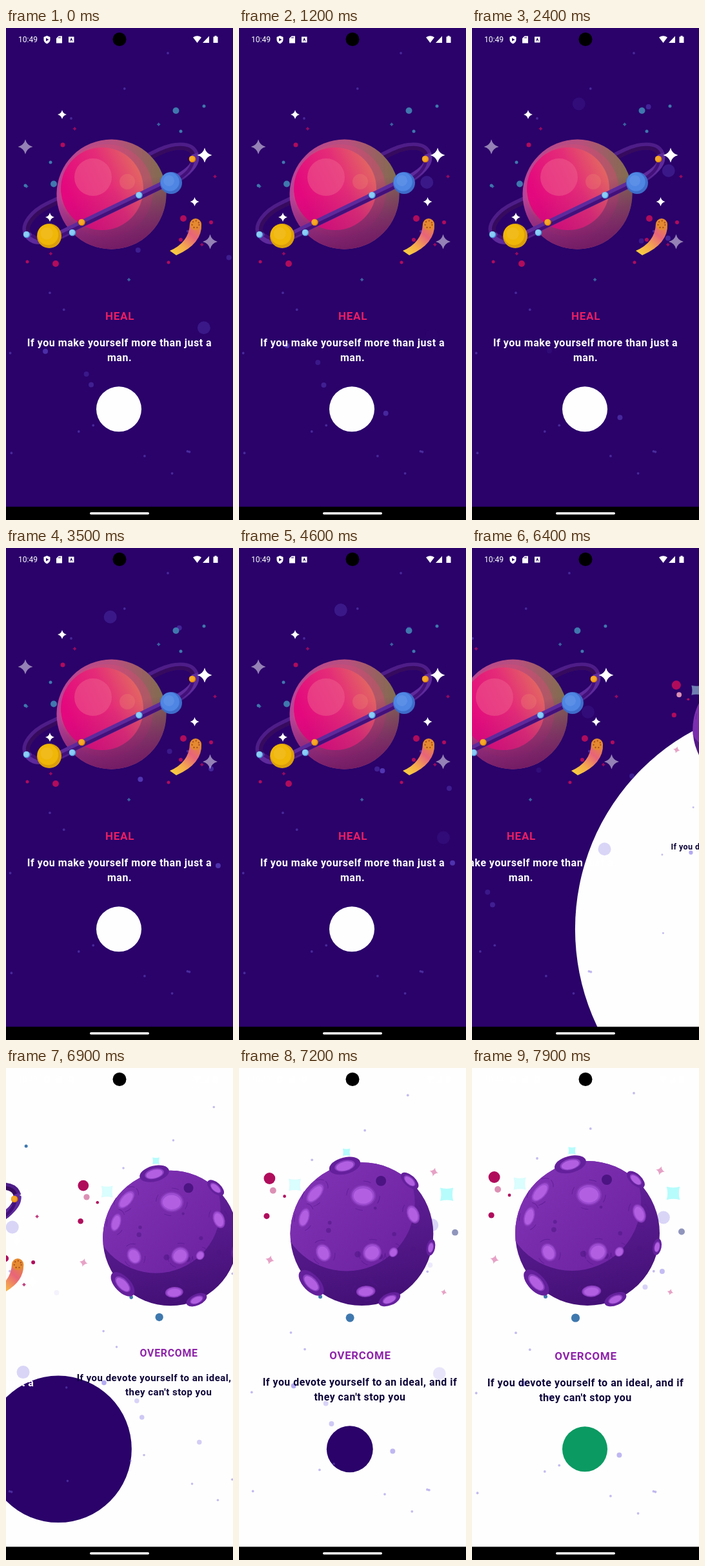
Recreate the animation shown at these times as an HTML page. Size 352 px wide and 762 px high, loop 8000 ms.

```html
<!DOCTYPE html>
<html lang="en">
<head>
<meta charset="utf-8">
<title>Onboarding</title>
<style>
html, body { margin: 0; width: 100%; height: 100%; overflow: hidden; background: #000; }
svg { display: block; }
text { font-family: Roboto, sans-serif; text-anchor: middle; }
.title { font-size: 17px; font-weight: 700; letter-spacing: .75px; }
.body { font-size: 16px; font-weight: 700; letter-spacing: .53px; }
</style>
</head>
<body>
<svg width="352" height="762" viewBox="0 0 352 762">
<defs>
  <linearGradient id="shell">
    <stop offset="0" stop-color="#b8439a"/><stop offset=".55" stop-color="#b8507c"/><stop offset="1" stop-color="#7c704a"/>
  </linearGradient>
  <linearGradient id="shade" x1=".4" y1=".3" x2=".55" y2="1">
    <stop offset=".2" stop-color="#7a1470" stop-opacity="0"/><stop offset="1" stop-color="#701a64" stop-opacity=".95"/>
  </linearGradient>
  <linearGradient id="core" x1=".15" y1=".7" x2="1" y2=".3">
    <stop offset="0" stop-color="#e4087e"/><stop offset=".55" stop-color="#e42c78"/><stop offset="1" stop-color="#e26a60"/>
  </linearGradient>
  <linearGradient id="tail" x1="0" y1="1" x2=".9" y2="0">
    <stop offset="0" stop-color="#fbd83e"/><stop offset=".35" stop-color="#f5ae4a"/><stop offset=".7" stop-color="#e8647a"/><stop offset="1" stop-color="#e58a3c"/>
  </linearGradient>
  <linearGradient id="lit" x1="0" y1="0" x2="1" y2="1">
    <stop offset="0" stop-color="#8638ba"/><stop offset="1" stop-color="#6b219f"/>
  </linearGradient>
  <linearGradient id="dark" x1=".3" y1="0" x2=".5" y2="1">
    <stop offset="0" stop-color="#6a24a2"/><stop offset="1" stop-color="#431076"/>
  </linearGradient>
  <clipPath id="globe"><circle cx="179" cy="256" r="112"/></clipPath>
  <g id="dust"></g>
</defs>

<rect id="back" width="352" height="762"/>
<circle id="button" cy="590.3"/>

<g id="page0">
  <use href="#dust"/>
  <g id="sky0"></g>
  <g transform="translate(163 257) rotate(-25.7)" fill="none">
    <rect x="-144" y="-27" width="288" height="51" rx="48" ry="25" stroke="#4e1d88" stroke-width="11"/>
    <rect x="-141" y="-24" width="282" height="45" rx="45" ry="22" stroke="#360a5e" stroke-width="6"/>
  </g>
  <circle cx="163.500" cy="257.500" r="85" fill="url(#shell)"/>
  <circle cx="156" cy="252" r="72" fill="#d84a70" opacity=".4"/>
  <circle cx="163.500" cy="257.500" r="85" fill="url(#shade)"/>
  <circle cx="149" cy="249" r="64" fill="url(#core)"/>
  <circle cx="163.500" cy="257.500" r="85" fill="url(#shade)" opacity=".35"/>
  <circle cx="135" cy="231" r="29" fill="#f0608e" opacity=".5"/>
  <circle cx="188" cy="238" r="12" fill="#ee8870" opacity=".3"/>
  <g transform="translate(163 257) rotate(-25.7)" fill="none">
    <path id="band" d="M-144 0C-142 20 -120 22 -96 22H96C120 22 142 18 144 0" stroke="#5e2a9c" stroke-width="11"/>
    <path d="M-139 4C-130 21 -112 24.500 -96 24.500H96C116 24.500 132 20 139 4" stroke="#43107a" stroke-width="5"/>
  </g>
  <g id="moons"></g>
  <path d="M303 303Q305 334 264 352L254 345Q284 332 285 303Z" fill="url(#tail)"/>
  <circle cx="294" cy="304" r="9" fill="#e58a30"/>
  <circle cx="294" cy="304" r="5.500" fill="none" stroke="#a84c20" stroke-width="2" stroke-dasharray="2 3"/>
  <text class="title" x="176.500" y="452" fill="#e91e63">HEAL</text>
  <g class="body" fill="#fff"><text x="176" y="493">If you make yourself more than just a</text><text x="176" y="516">man.</text></g>
</g>

<g id="page1">
  <use href="#dust"/>
  <g id="sky1"></g>
  <circle cx="179" cy="256" r="112" fill="url(#dark)"/>
  <circle cx="155" cy="207" r="107" fill="url(#lit)" clip-path="url(#globe)"/>
  <g id="craters"></g>
  <text class="title" x="176.500" y="452" fill="#8e24aa">OVERCOME</text>
  <g class="body" fill="#0c0438"><text x="176" y="493">If you devote yourself to an ideal, and if</text><text x="176" y="516">they can't stop you</text></g>
</g>

<g fill="#fff" fill-rule="evenodd">
  <text x="34" y="22" font-size="12">10:49</text>
  <path d="M63.500 12l5 2v4q0 4-5 6.500q-5-2.500-5-6.500v-4zM62 15.500v5l4.500-2.500z"/>
  <path d="M81.500 12.500h5.500v11h-9v-7.500zM81.500 14v2h1v-2zm2 0v2h1v-2z"/>
  <path d="M97 13.500h8.500v9h-8.500zM99 20.500h1l.5-1.500h1.500l.5 1.500h1l-1.700-5h-1z"/>
  <path d="M290 14.500Q296.500 10 303 14.500L296.500 23zM305 23l10-10.500v10.500zM321.500 13.500h2v-1.500h3v1.500h2v9.500h-7z"/>
</g>
<circle cx="176" cy="17.500" r="10.500"/>
<rect y="741.500" width="352" height="21"/>
<rect x="130" y="750" width="92" height="3.500" rx="1.750" fill="#fff"/>
</svg>

<script>
const $ = id => document.getElementById(id);
let seed = 11;
const rand = (lo, hi) => lo + (hi - lo) * (seed = seed * 16807 % 2147483647) / 2147483647;
const repeat = (n, make) => Array.from({ length: n }, (_, i) => make(i));

function add(parent, tag, attrs) {
  const el = document.createElementNS('http://www.w3.org/2000/svg', tag);
  for (const k in attrs) el.setAttribute(k, attrs[k]);
  return $(parent).appendChild(el);
}
const dot = (parent, cx, cy, r, fill, opacity = 1) => add(parent, 'circle', { cx, cy, r, fill, opacity });
const oval = (x, y, rx, ry, turn, style) =>
  add('craters', 'ellipse', { rx, ry, transform: `translate(${x} ${y}) rotate(${turn})`, ...style });

// Four-pointed star; k is the fatness of the waist.
function star(parent, x, y, s, fill, opacity = 1, turn = 0, k = .2) {
  const c = s * k;
  add(parent, 'path', {
    d: `M0 ${-s}Q${c} ${-c} ${s} 0Q${c} ${c} 0 ${s}Q${-c} ${c} ${-s} 0Q${-c} ${-c} 0 ${-s}Z`,
    transform: `translate(${x} ${y}) rotate(${turn})`, fill, opacity
  });
}

function ball(x, y, r, base, light) {
  dot('moons', x, y, r, base);
  dot('moons', x - r * .1, y - r * .1, r * .85, light);
  dot('moons', x - r * .2, y - r * .2, r * .5, '#fff', .08);
}

// Ringed planet
const teal = '#3f78ae', wine = '#b00c5c';
for (const [x, y, r] of [[263.5, 128, 5], [74, 241.5, 5], [307, 121, 2.5], [271, 160, 2.5], [69, 208, 2.5], [30, 244, 2.5]])
  dot('sky0', x, y, r, teal);
for (const [x, y, r] of [[275, 295, 5], [77, 365, 5], [88, 181, 3.5], [271, 328, 3], [318, 301, 3], [33, 362, 2.5], [252, 363, 2.5]])
  dot('sky0', x, y, r, wine);
repeat(7, i => star('sky0', 180 + 150 * Math.cos(i * .9 + .6), 265 + 125 * Math.sin(i * .9 + .6), 3, i % 2 ? teal : wine, .8, 0, .4));

for (const [x, y, s, alpha] of [[87, 134, 7, 1], [308, 197, 11.5, 1], [68, 293, 7, 1], [292.5, 269, 7, 1], [30, 184, 11.5, .5], [316.5, 331, 11.5, .5]])
  star('moons', x, y, s, '#fff', alpha);
ball(67, 322, 19, '#dc9e0a', '#f0b608');
ball(256, 240, 17, '#3e6cca', '#4f86e4');
for (const [x, y] of [[32, 320], [103, 317], [206.5, 259]]) ball(x, y, 5.3, '#4a92d4', '#84caf6');
for (const [x, y] of [[117.5, 301], [289, 203]]) ball(x, y, 5.3, '#d87c10', '#f6a41c');

// Cratered planet
for (const [x, y, r, fill] of [[34.5, 169, 9, wine], [30, 228, 4.6, wine], [58, 197, 2.4, wine], [40, 188, 5, '#dc90b4'],
  [325, 253.5, 5, '#9095bc'], [160.5, 387, 6.6, teal], [114, 354, 3, teal]])
  dot('sky1', x, y, r, fill);
for (const [x, y, s] of [[292, 159, 7], [35, 296.5, 7], [307.5, 347, 5]]) star('sky1', x, y, s, '#e6a2c6', 1, 15);
for (const [x, y, s, alpha] of [[155, 128, 8, 1], [312, 194, 14.5, 1], [74, 179, 13.5, .5]])
  star('sky1', x, y, s, '#b6fcfc', alpha, 45, .36);

// Craters flatten towards the outline, where they also stand out from it.
function crater(angle, dist, size) {
  const a = angle * Math.PI / 180, outer = dist > 100;
  const x = 179 + dist * Math.cos(a), y = 256 + dist * Math.sin(a);
  const flat = size * Math.max(.52, Math.sqrt(1 - (dist / 112) ** 2)), turn = angle + 90;
  if (!outer) oval(x, y, size + 6, flat + 6, turn, { fill: 'none', stroke: '#54178c', 'stroke-dasharray': '12 26', opacity: .6 });
  oval(x, y, size, flat, turn, { fill: outer ? '#64209c' : '#8438b8' });
  const inset = outer ? .65 : .88;
  oval(x, y, size * inset, flat * inset, turn, { fill: outer ? '#8a40c0' : '#9c4cd0' });
  oval(x, y + .5, size * inset * .85, flat * inset * .8, turn, { fill: '#b25fe2' });
}
repeat(9, () => {
  const a = rand(0, 6.28), d = rand(15, 95);
  dot('craters', 179 + d * Math.cos(a), 256 + d * Math.sin(a), rand(2, 6), '#4c1482', .5);
});
dot('craters', 209, 173, 8, '#4c1482');
for (const c of [[-104, 110, 25], [-48, 112, 17], [11, 110, 13], [67, 111, 18], [136, 110, 25], [-139, 97, 19], [-164, 94, 16],
  [-21, 86, 15], [-88, 60, 20], [154, 67, 14.5], [61, 33, 15], [30, 57, 8], [86, 90, 15]])
  crater(...c);

// Dust: still specks, and bubbles that drift, fade in and fade out
repeat(14, () => dot('dust', rand(0, 352), rand(30, 690), 1.9, '#7260dc', .42));
const drift = 6200, life = 3000;
const bubbles = repeat(14, i => ({
  x: rand(20, 330), y: rand(60, 620), dx: rand(-45, 45), dy: rand(-45, 45), birth: i * drift / 14,
  alpha: i % 5 ? rand(.25, .6) : .25,
  el: dot('dust', 0, 0, i % 5 ? 4 : 10, '#6c5ae4')
}));

function moveBubbles(t) {
  for (const { x, y, dx, dy, birth, alpha, el } of bubbles) {
    const k = (t - birth + drift) % drift / life;
    el.setAttribute('transform', `translate(${x + dx * k} ${y + dy * k})`);
    el.setAttribute('opacity', alpha * Math.max(0, Math.min(1, 8 * k, 8 * (1 - k))));
  }
}

const violet = '#2a026a', white = '#fefefe', green = '#0a9a62';
const slide = [[5835, 0], [6000, .108], [6400, .358], [6900, .692], [7380, 1]];

// Share of the page turn done at time t
function turned(t) {
  const i = slide.findIndex(([end]) => t < end);
  if (i < 1) return i ? 1 : 0;
  const [[t0, a], [t1, b]] = slide.slice(i - 1);
  return (1 - Math.cos(Math.PI * (a + (b - a) * (t - t0) / (t1 - t0)))) / 2;
}

function turnPage(p) {
  const growing = p < .5, q = growing ? p : 1 - p;
  const r = 34 + 2 ** (29.2 * q), gap = 35 * (1 - 2 * q);
  $('back').setAttribute('fill', growing ? violet : white);
  $('button').setAttribute('fill', growing ? white : p < 1 ? violet : green);
  $('button').setAttribute('r', r);
  $('button').setAttribute('cx', growing ? 175 - gap + r : 175 + gap - r);
  $('page0').setAttribute('transform', `translate(${-352 * p} 0)`);
  $('page0').style.display = p < 1 ? '' : 'none';
  $('page1').setAttribute('transform', `translate(${176 + 352 * (1 - p)} 371) scale(${.7 + .3 * p}) translate(-176 -371)`);
  $('page1').style.display = p > 0 ? '' : 'none';
}

function frame() {
  const t = Math.floor(performance.now() % 8000 / 100) * 100;
  moveBubbles(t);
  turnPage(turned(t));
  requestAnimationFrame(frame);
}
frame();
</script>
</body>
</html>
```
